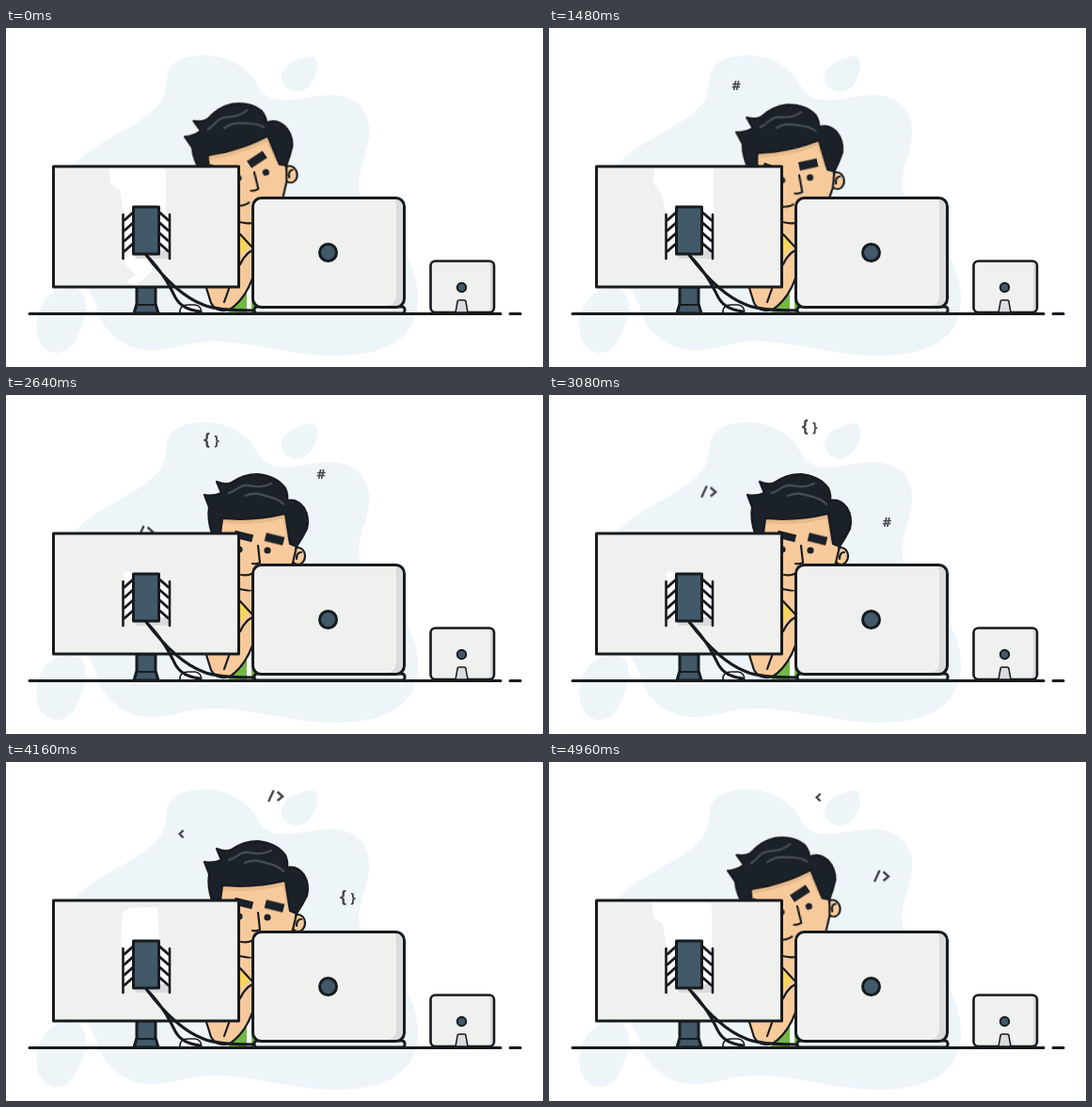
These frames come from a looping animation (571x360 px, 5000 ms). An HTML page without scripts:

```html
<!DOCTYPE html>
<html lang="en">
<head>
<meta charset="utf-8">
<title>Coder at a desk</title>
<style>
  html, body { margin: 0; width: 100%; height: 100%; overflow: hidden; background: #fff; }
  svg { display: block; width: 100vw; height: 100vh; }

  .ink { stroke: #171b1f; stroke-width: 3; stroke-linejoin: round; stroke-linecap: round; }
  .thin { stroke-width: 2.2; }
  .line { fill: none; }
  .blob { fill: #edf5f9; }
  .shell { fill: #eff1ef; }
  .shade { fill: #d9dbdd; }
  .steel { fill: #415968; }
  .skin { fill: #f7ca9c; }
  .hair { fill: #1b2129; }
  .white { fill: #fff; }
  .sign { fill: none; stroke: #41464b; stroke-width: 2.4; }

  /* Head and features share one timing; each sets its own two poses. */
  .turn { animation: turn 5s ease-in-out infinite; }
  .head { --left: translate(-2px, 1px) rotate(-13.5deg); --right: translate(0, 0) rotate(0deg); transform-origin: 237px 190px; }
  .brow-r { --left: translate(280px, 147.5px) rotate(-20deg); --right: translate(285.5px, 153px) rotate(14deg); }
  .brow-l { --left: translate(236px, 150px) rotate(40deg); --right: translate(252.5px, 150px) rotate(14deg); }
  .eyes { --left: translate(8px, -2px); --right: translate(0, 0); }
  .nose { --left: translate(6px, 0) rotate(6deg); --right: translate(0, 0) rotate(0deg); transform-origin: 268px 160px; }
  @keyframes turn {
    0%, 24%, 98%, 100% { transform: var(--left); }
    36%, 87% { transform: var(--right); }
  }

  /* Symbols follow one arc, each with its own delay. */
  text { font-family: "Open Sans", sans-serif; font-weight: 700; font-size: 15px; fill: #41464b; text-anchor: middle; }
  .fly { animation: arc 5s linear infinite; animation-delay: calc(var(--start) - 5s); }
  .gate { animation: gate 5s step-end infinite; }
  @keyframes gate { 0% { visibility: hidden; } 50%, 100% { visibility: visible; } }
  @keyframes arc {
    0%, 5% { transform: translate(148px, 182px); }
    12.8% { transform: translate(149px, 145px); }
    23.2% { transform: translate(174px, 95px); }
    27.2% { transform: translate(187px, 75px); }
    29.6% { transform: translate(199px, 61px); }
    32.8% { transform: translate(218px, 48px); }
    38.4% { transform: translate(256px, 31px); }
    43.2% { transform: translate(287px, 36px); }
    49.6% { transform: translate(325px, 66px); }
    52.8% { transform: translate(335px, 83px); }
    59.2% { transform: translate(354px, 121px); }
    63.2% { transform: translate(363px, 144px); }
    69.6% { transform: translate(369px, 174px); }
    75%, 100% { transform: translate(372px, 205px); }
  }

  .glare { animation: glare 5s step-end infinite; }
  @keyframes glare {
    0%, 100% { d: path("M110 149H167L170 152V200H126L121 172L111 165ZM127 240H150L156 258L138 273L128 270L138 262L126 250Z"); }
    20% { d: path("M112 149H175V200H126L119 176L111 165Z"); }
    40% { d: path("M107 149H174L175 200H126L118 172Z"); }
    50% { d: path("M125 187L132 188L140 190V200H126Z"); }
    62% { d: path("M122 149H162V200H126L124 180Z"); }
    79% { d: path("M124 160L132 155L161 154L163 200H126L122 192Z"); }
    94% { d: path("M110 149H167L173 152V200H126L121 172L111 165Z"); }
  }
</style>
</head>
<body>
<svg viewBox="0 0 571 360">
  <g class="blob">
    <path d="M62 162C78 122 138 112 164 79C176 62 162 40 190 32C224 22 256 38 267 60C280 88 314 72 345 71C376 72 391 93 385 122C379 150 368 166 382 188C400 214 438 238 438 288C437 334 398 348 350 348C300 348 270 334 222 333C190 332 178 344 148 342C120 338 100 318 96 294C84 272 50 214 62 162Z"/>
    <path d="M62 276C82 272 90 290 82 312C76 333 66 347 51 345C35 342 29 322 34 304C38 290 48 279 62 276Z"/>
    <path d="M324 30C332 29 333 42 328 53C323 64 314 70 305 67C295 64 290 54 295 45C300 37 314 31 324 30Z"/>
  </g>

  <!-- body -->
  <path d="M236 303L250 275L264 250V303Z" fill="#72b844"/>
  <path class="white" d="M256 270H261V303H256Z"/>
  <path class="skin" d="M240 185H264V262Q254 288 238 299Q224 303 218 292L212 270L240 225Z"/>
  <path d="M248 219L260 231L248 242Z" fill="#fbd45a"/>
  <path class="ink thin line" d="M248 206Q256 208 264 207M249 219L261 232M262 236Q254 240 249 251M213 276L218 292Q224 303 238 299Q254 288 262 266M237 277L232 291"/>

  <!-- head -->
  <g class="turn head">
    <ellipse class="skin ink thin" cx="310.500" cy="171" rx="7.500" ry="9"/>
    <path class="skin" d="M228 126L298 118L308 156L305 178L298 192Q290 207 268 208Q238 206 233 186L226 146Z"/>
    <path class="ink thin line" d="M309 161L305 178L298 192M314 167Q309 167 309 174"/>
    <path d="M231 134Q264 137 296 129L301 154" fill="none" stroke="#e6b98d" stroke-width="4"/>
    <path class="hair ink thin" d="M219 147Q214 132 216 119L211 106Q220 108 229 104L224 92Q232 96 240 93Q252 84 268 84Q288 86 297 99Q300 106 299 112Q310 110 317 120Q323 130 320 142Q315 152 309 161L302 158L297 126Q264 134 230 131L228 147Z"/>
    <path d="M237 104C248 101 247 95 257 96S272 99 282 94M254 107C264 103 270 105 276 107S288 109 295 116" fill="none" stroke="#454b53" stroke-width="2.4" stroke-linecap="round"/>
    <rect class="turn brow-l hair" x="-10" y="-4" width="20" height="8"/>
    <rect class="turn brow-r hair" x="-10" y="-4.500" width="20" height="9"/>
    <g class="turn eyes hair">
      <circle cx="248" cy="164" r="3.600"/>
      <circle cx="278" cy="165" r="3.600"/>
    </g>
    <path class="turn nose ink thin line" d="M268 160L270 178Q266 180 262 179"/>
    <path class="ink thin line" d="M250 191Q257 192 261 190"/>
  </g>

  <!-- code symbols -->
  <text class="fly" style="--start: 0s" y="5.500">#</text>
  <g class="fly" style="--start: 1s">
    <text x="-4.500" y="5" style="font-size: 18px">{</text>
    <text x="6" y="5" style="font-size: 14px">}</text>
  </g>
  <g class="gate">
    <g class="fly" style="--start: 2s">
      <path class="sign" d="M-8 6L-2.500 -6M1.500 -4.500L7 0.500L1.500 5"/>
    </g>
  </g>
  <g class="gate">
    <g class="fly" style="--start: 2.8s">
      <path class="sign" d="M1.500 -2.500L-2.500 1.500L1.500 5.500"/>
    </g>
  </g>

  <!-- large monitor -->
  <path class="steel ink" d="M139 275H159V293L162 303H136L139 293Z"/>
  <path class="ink thin line" d="M139 294H159"/>
  <rect class="shell ink" x="50.500" y="147" width="197" height="128"/>
  <path class="white glare" d="M110 149H167L173 152V200H126L121 172L111 165Z"/>
  <path class="white" d="M126 198H173V236H126Z"/>
  <path class="shade" d="M135 236H171L175 245H138Z"/>
  <path class="ink line" d="M124.500 198V245M174 198V245" style="stroke-width: 2.6"/>
  <g class="ink line">
    <path id="arms" d="M135 196L126 204M135 207L126 215M135 218L126 226M135 229L126 237"/>
    <use href="#arms" transform="matrix(-1 0 0 1 298.500 0)"/>
  </g>
  <rect class="steel ink" x="135.500" y="190" width="27" height="50"/>

  <!-- cables and mouse -->
  <path class="white ink" d="M185 303Q184 294 194 294H201Q208 295 208 303Z" style="stroke-width: 1.5"/>
  <path class="ink line" d="M149 241C166 258 174 274 180 286Q187 299 206 301M149 241C168 266 188 286 210 294Q224 300 264 300"/>

  <!-- desk -->
  <path class="ink line" d="M25 303.500H526M536 303.500H547"/>

  <!-- laptop -->
  <rect class="shell ink" x="264" y="296" width="160" height="7" rx="3"/>
  <rect class="shell" x="262.500" y="180.500" width="161" height="116" rx="9"/>
  <path class="shade" d="M413 182Q422 182 422 192V287Q422 295 412 295H405Q415 294 415 284V190Q415 184 413 182Z"/>
  <rect class="ink line" x="262.500" y="180.500" width="161" height="116" rx="9"/>
  <circle class="steel ink" cx="342.500" cy="238.500" r="9"/>

  <!-- small display -->
  <rect class="shell" x="451.500" y="247.500" width="67.500" height="54.500" rx="5"/>
  <path class="shade" d="M513 249Q518 249 518 254V296Q518 301 513 301Q515 299 515 295V254Q515 251 513 249Z"/>
  <rect class="ink line" x="451.500" y="247.500" width="67.500" height="54.500" rx="5" style="stroke-width: 2.6"/>
  <path class="shade ink" d="M478 302L480 291Q480 289 482 289H487Q489 289 489 291L491 302Z" style="stroke-width: 1.5"/>
  <circle class="steel ink" cx="484.500" cy="275.500" r="4.700" style="stroke-width: 2"/>
</svg>
</body>
</html>
```
